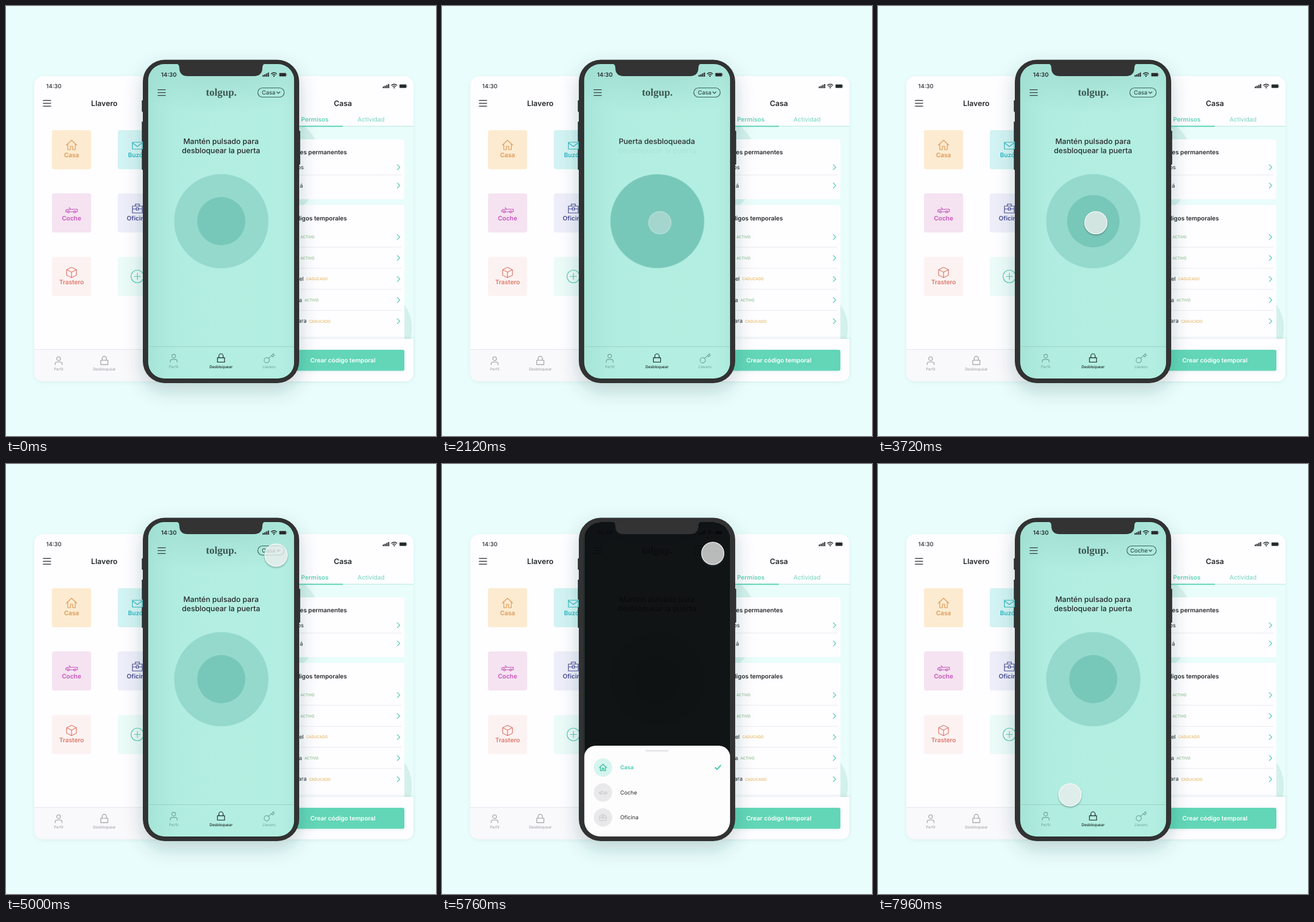
An HTML page that plays this animation: 748 by 748 pixels, repeating every 8 s.

```html
<!DOCTYPE html>
<html lang="es">
<head>
<meta charset="utf-8">
<title>Llavero digital</title>
<style>
  html, body { margin: 0; width: 100%; height: 100%; overflow: hidden; background: #e9fdfc; }
  svg { display: block; width: 748px; height: 748px; font-family: Inter, "Open Sans", sans-serif; text-rendering: geometricPrecision; }
  .line { fill: none; stroke: currentColor; stroke-width: 1.2; stroke-linecap: round; stroke-linejoin: round; }
</style>
</head>
<body>
<svg id="stage" viewBox="0 0 748 748"></svg>
<script>
const LOOP = 8000;
const TEAL = '#5fd3b8', INK = '#26292b';

// Icons are drawn around their own centre.
const ICONS = {
  house: 'M-9 0L0-8.5L9 0M-6.5-2V8H-2V2H2V8H6.5V-2',
  mail: 'M-8.5-6H8.5V6H-8.5ZM-8.5-5L0 1.5L8.5-5',
  car: 'M-7.2 3H-10V.6Q-9.5-1-6-1.2L-2-1.5H10V3H7.2M-3.8 3H3.8M-2-1.5L-4-4.5M-7.2 3a1.7 1.7 0 1 0 3.4 0a1.7 1.7 0 1 0-3.4 0M3.8 3a1.700 1.7 0 1 0 3.4 0a1.7 1.7 0 1 0-3.4 0',
  bag: 'M-8.5-4H8.5V8H-8.5ZM-3.5-4V-7.5H3.5V-4M-8.5 1H-2M2 1H8.5M-2-.8H2V3H-2Z',
  box: 'M0-9L8.5-4.8V4.8L0 9L-8.5 4.8V-4.8ZM-8.5-4.8L0-.5L8.5-4.8M0-.5V9',
  plus: 'M-11 0a11 11 0 1 0 22 0a11 11 0 1 0-22 0M-5.5 0H5.5M0-5.5V5.5',
  user: 'M-3.2-3.6a3.2 3.2 0 1 0 6.4 0a3.2 3.2 0 1 0-6.4 0M-6 7V5.5Q-6 2.2-2.7 2.2H2.7Q6 2.2 6 5.5V7',
  lock: 'M-6.2-.8H6.2V6.8H-6.2ZM-3.7-.8V-4a3.7 3.7 0 0 1 7.4 0V-.8',
  key: 'M-8.5 3.5a4.6 4.6 0 1 0 9.2 0a4.6 4.6 0 1 0-9.2 0M-.7.4L8-8M4.3-4.5L6.3-2.3L9.3-5.2L7-7.2',
  chevron: 'M-2.3-4.3L2-0L-2.3 4.3',
  check: 'M-4.5.2L-1.5 3.4L4.5-3.6'
};

const text = (x, y, str, size, weight = 400, color = INK, anchor = 'start', extra = '') =>
  `<text x="${x}" y="${y}" font-size="${size}" font-weight="${weight}" fill="${color}" text-anchor="${anchor}" ${extra}>${str}</text>`;
const rect = (x, y, w, h, fill, r = 0, extra = '') =>
  `<rect x="${x}" y="${y}" width="${w}" height="${h}" rx="${r}" fill="${fill}" ${extra}/>`;
const circle = (x, y, r, fill, extra = '') => `<circle cx="${x}" cy="${y}" r="${r}" fill="${fill}" ${extra}/>`;
const rule = (x1, x2, y, color, width = 1) =>
  `<path d="M${x1} ${y}H${x2}" stroke="${color}" stroke-width="${width}" fill="none"/>`;
const icon = (name, x, y, color, scale = 1, width = 1.2) =>
  `<path class="line" d="${ICONS[name]}" transform="translate(${x} ${y}) scale(${scale})" style="color:${color};stroke-width:${width / scale}"/>`;

const burger = (x, y) => [-5, 0, 5].map(d => rule(x, x + 14, y + d, '#33393a', 1.4)).join('');

function statusIcons(x, y) {
  const bars = [3, 4.3, 5.8, 7.3].map((h, i) => rect(x + i * 3, y - h, 2.1, h, INK, .5)).join('');
  const arcs = `<path d="M${x + 14.8} ${y - 4.8}q5-4.4 10 0M${x + 16.7} ${y - 2.7}q3.1-2.6 6.2 0" stroke="${INK}" stroke-width="1.5" fill="none"/>`;
  return bars + arcs + circle(x + 19.8, y - .9, 1.2, INK) +
    rect(x + 29, y - 6.5, 12, 6, INK, 1.3, `stroke="#8a9694" stroke-width=".7"`) + rect(x + 41.8, y - 4.5, .9, 2, '#8a9694');
}

function tile(x, y, fill, name, label, color, iconY = 27) {
  return rect(x, y, 68, 68, fill, 4) + icon(name, x + 34, y + iconY, color) +
    text(x + 34, y + 47, label, 10.7, 600, color, 'middle');
}

const navItem = (x, y, name, label, color, weight = 400) =>
  icon(name, x, y, color, 1, 1.15) + text(x, y + 17.3, label, 6.6, weight, color, 'middle');

function leftCard() {
  return rect(49, 122, 230, 531, '#fefdff', 16, 'filter="url(#cardShadow)"') +
    `<path d="M49 597.5H279V653H65Q49 653 49 637Z" fill="#f9f8fb"/>` + rule(49, 279, 597.5, '#e6e5ea') +
    text(70, 142.6, '14:30', 10, 500) + burger(64.3, 169.3) + text(171, 174, 'Llavero', 13, 600, INK, 'middle') +
    tile(80, 216, '#fcebd0', 'house', 'Casa', '#dc9858', 26) +
    tile(194.5, 216, '#d2f3f3', 'mail', 'Buzón', '#2bb8c0') +
    tile(80, 326, '#f5e3f1', 'car', 'Coche', '#c652ba', 29) +
    tile(194.5, 326, '#eeeefa', 'bag', 'Oficina', '#474891', 26) +
    tile(80, 436.5, '#fdf2f2', 'box', 'Trastero', '#dd7868') +
    tile(194.5, 436.5, '#ebfbf8', 'plus', '', '#58cdb3', 34) +
    navItem(91.5, 617, 'user', 'Perfil', '#9b9b9f') + navItem(171, 617, 'lock', 'Desbloquear', '#9b9b9f');
}

function permitRow(y, ending, endX, active) {
  const [label, color] = active ? ['ACTIVO', '#76b17c'] : ['CADUCADO', '#e2ab43'];
  return text(endX, y + 3, ending, 9.8, 400, INK, 'end') + text(endX + 4.2, y + 2.4, label, 6.5, 400, color) +
    icon('chevron', 683, y, TEAL, 1, 1.4);
}

function rightCard() {
  const rows = [[402, '', 508, 1], [438.3, '', 508, 1], [475, 'el', 518, 0], [511.6, 'a', 515, 1], [548.2, 'ara', 523, 0]];
  return rect(479, 122, 230, 531, '#fefdff', 16, 'filter="url(#cardShadow)"') +
    `<g clip-path="url(#rightBody)">` + rect(479, 210, 230, 370, '#e9fdfb') +
    circle(460, 277, 90, '#d3f1ec') + circle(636, 560, 70, '#d3f1ec') + '</g>' +
    statusIcons(655.5, 143) + text(586, 174, 'Casa', 13, 600, INK, 'middle') +
    text(561, 201, 'Permisos', 10.6, 600, TEAL, 'end') + text(635, 201, 'Actividad', 10.6, 400, '#74d5bf', 'middle') +
    rule(479, 709, 209.3, '#c5f0e6', 1.5) + rule(479, 586, 209.2, TEAL, 2) +
    rect(479, 232, 214, 104, '#fefdff', 4) + rect(479, 346, 214, 240, '#fefdff', 4) +
    text(593, 258, 'Llaves permanentes', 10.5, 600, INK, 'end') +
    text(518, 284, 'os', 9.8, 400, INK, 'end') + text(516.5, 315.5, 'á', 9.8, 400, INK, 'end') +
    [280.5, 312.3].map(y => icon('chevron', 683, y, TEAL, 1, 1.4)).join('') +
    text(593, 373, 'Códigos temporales', 10.5, 600, INK, 'end') +
    [294, 419.6, 456.2, 492.8, 529.5].map(y => rule(490, 688, y, '#e9e8ed')).join('') +
    rows.map(r => permitRow(...r)).join('') +
    `<path d="M479 579H709V637Q709 653 693 653H479Z" fill="#fefdff" filter="url(#footShadow)"/>` +
    rect(479, 598, 214, 36.5, '#62d6b7', 3, 'filter="url(#cardShadow)"') +
    text(586, 620, 'Crear código temporal', 10.5, 600, '#fff', 'middle');
}

function sheetRow(y, name, label, id) {
  return `<g id="${id}"><circle class="disc" cx="280" cy="${y}" r="16"/>${icon(name, 280, y, 'inherit', .68, 1.2)}` +
    text(310, y + 3.2, label, 9.5, 400) + '</g>';
}

function phone() {
  const button = (x, y, h) => rect(x, y, 4, h, '#2b2b2b', 1.2);
  const screen = (fill, extra) => rect(247, 101, 254.5, 547, fill, 0, extra);
  return button(236.3, 164, 20) + button(236.3, 201, 35) + button(236.3, 249, 36) + button(507.7, 217, 59) +
    rect(238, 93.5, 272, 562.5, '#333', 38, 'filter="url(#phoneShadow)"') +
    rect(246.3, 100.7, 255.4, 547.8, '#1c1f1f', 29) +
    `<g clip-path="url(#screen)">` + screen('#b2eee1') + screen('url(#sideTint)') + rect(247, 101, 254.5, 110, 'url(#topTint)') +
    text(269.8, 123, '14:30', 10, 600) + statusIcons(446.3, 123) + burger(263.8, 150.6) +
    text(374.5, 155.5, 'tolgup.', 18, 700, '#3c5752', 'middle', `style="font-family:'Liberation Serif',serif"`) +
    `<rect id="pill" y="142.5" height="16" rx="8" fill="none" stroke="#3c5f58" stroke-width="1.2"/>` +
    `<text id="pillText" y="154" font-size="9.8" font-weight="500" fill="#34514c"></text>` +
    `<path class="line" d="M471 149.3l2.8 2.7l2.8-2.7" style="color:#34514c"/>` +
    `<g id="hint">` + text(374, 239.8, 'Mantén pulsado para', 13, 500, INK, 'middle') +
    text(374, 256, 'desbloquear la puerta', 13, 500, INK, 'middle') + '</g>' +
    text(373.7, 239.8, 'Puerta desbloqueada', 13, 500, INK, 'middle', 'id="done"') +
    circle(374.5, 374.3, 82, '#95d9cd') + circle(374.5, 374.3, 42, '#78c8ba', 'id="core"') +
    rule(247, 501.5, 592.5, '#98cfc4') +
    navItem(291.7, 612.7, 'user', 'Perfil', '#6f9f96') + navItem(374, 612.7, 'lock', 'Desbloquear', '#15201e', 500) +
    navItem(457.5, 612.7, 'key', 'Llavero', '#6f9f96') +
    screen('#08080a', 'id="shade" opacity="0"') +
    `<g id="sheet">` + rect(247.3, 489.9, 254, 190, '#fefdfe', 20) + rect(354, 497.6, 40, 2.6, '#e4e4e7', 1.3) +
    sheetRow(528, 'house', 'Casa', 'rowCasa') + sheetRow(571.5, 'car', 'Coche', 'rowCoche') + sheetRow(614.7, 'bag', 'Oficina', 'rowOficina') +
    `<g id="check">${icon('check', 480, 528, '#41c9ad', 1, 2.1)}</g></g></g>` +
    `<path d="M295 100H452Q446 101 446 107Q446 122 431 122H316Q301.5 122 301.5 107Q301.5 101 295 100Z" fill="#333"/>`;
}

const defs = `<defs>
  <clipPath id="screen"><rect x="247.3" y="101" width="254" height="547" rx="28"/></clipPath>
  <clipPath id="rightBody"><rect x="479" y="210" width="230" height="370"/></clipPath>
  <linearGradient id="sideTint"><stop offset="0" stop-color="#5fae9f" stop-opacity=".16"/><stop offset=".2" stop-color="#8fd5c8" stop-opacity=".05"/><stop offset=".85" stop-color="#fff" stop-opacity="0"/><stop offset="1" stop-color="#5fae9f" stop-opacity=".08"/></linearGradient>
  <radialGradient id="topTint" cx=".5" cy="0" r=".8"><stop offset="0" stop-color="#5b9f92" stop-opacity=".22"/><stop offset="1" stop-color="#5b9f92" stop-opacity="0"/></radialGradient>
  <filter id="cardShadow" x="-10%" y="-10%" width="120%" height="130%"><feDropShadow dx="0" dy="1.5" stdDeviation="2.5" flood-color="#57918b" flood-opacity=".13"/></filter>
  <filter id="footShadow" x="-10%" y="-20%" width="120%" height="140%"><feDropShadow dx="0" dy="-2" stdDeviation="2" flood-color="#57918b" flood-opacity=".14"/></filter>
  <filter id="phoneShadow" x="-30%" y="-15%" width="160%" height="135%"><feDropShadow dx="0" dy="13" stdDeviation="16" flood-color="#2a4846" flood-opacity=".23"/></filter>
  <filter id="tapShadow" x="-50%" y="-50%" width="200%" height="200%"><feGaussianBlur stdDeviation="1.8"/></filter>
  <mask id="outsideTap"><rect x="-40" y="-40" width="80" height="80" fill="#fff"/><circle r="20" fill="#000"/></mask>
</defs>`;

const cursor = `<g id="cursor"><g id="cursorShadow" mask="url(#outsideTap)">${circle(0, 2, 20, '#334c48', 'opacity=".42" filter="url(#tapShadow)"')}</g>` +
  circle(0, 0, 20, '#eee', 'fill-opacity=".76"') + circle(0, 0, 19.4, 'none', 'stroke="#fff" stroke-opacity=".75" stroke-width="1.2"') + '</g>';

document.getElementById('stage').innerHTML =
  defs + rect(0, 0, 748, 748, '#e9fdfc') + leftCard() + rightCard() + phone() + cursor;

const $ = id => document.getElementById(id);
const set = (id, attrs) => Object.entries(attrs).forEach(([k, v]) => $(id).setAttribute(k, v));
const clamp = p => Math.max(0, Math.min(1, p));
const ease = p => p < .5 ? 4 * p ** 3 : 1 - 4 * (1 - p) ** 3;
const ramp = (t, start, end) => ease(clamp((t - start) / (end - start)));
// 0 to 1 and back
const pulse = (t, a, b, c, d) => ramp(t, a, b) - ramp(t, c, d);

function setRow(id, selected) {
  const row = $(id);
  row.querySelector('.disc').setAttribute('fill', selected ? '#d6f4ee' : '#e9e9eb');
  row.querySelector('.line').style.color = selected ? '#41c3aa' : '#cbcbce';
  row.querySelector('.line').style.strokeWidth = selected ? 2.3 : 1.7;
  const label = row.querySelector('text');
  label.setAttribute('fill', selected ? '#41c9ad' : INK);
  label.setAttribute('font-weight', selected ? 600 : 400);
}

function render(t) {
  const hold = pulse(t, 1400, 2240, 3320, 3880);
  const unlocked = pulse(t, 1800, 2210, 3320, 3800);
  set('core', { r: 42 + 39.7 * hold });
  set('hint', { opacity: 1 - unlocked });
  set('done', { opacity: unlocked });

  const open = pulse(t, 5240, 5640, 7660, 7900);
  set('shade', { opacity: .945 * open });
  set('sheet', { transform: `translate(0 ${160 * (1 - open)})`, visibility: open > 0 ? 'visible' : 'hidden' });

  const coche = t >= 7240;
  setRow('rowCasa', !coche);
  setRow('rowCoche', coche);
  setRow('rowOficina', false);
  set('check', { transform: `translate(0 ${coche ? 43.5 : 0})` });

  const switched = t >= 7660;
  const left = switched ? 433 : 438;
  set('pill', { x: left, width: 484 - left });
  set('pillText', { x: switched ? 438.8 : 445 });
  $('pillText').textContent = switched ? 'Coche' : 'Casa';

  const toPill = ramp(t, 4500, 5090), toRow = ramp(t, 6580, 7005);
  const leave = clamp((t - 7660) / 300) ** 2;
  const x = 379 + 92 * toPill - 109 * toRow - 28 * leave;
  const y = 377 - 221.5 * toPill + 420 * toRow;
  const press = pulse(t, 1200, 1400, 2240, 2440) + pulse(t, 5100, 5200, 5220, 5340) + pulse(t, 7080, 7180, 7220, 7340);
  set('cursor', { transform: `translate(${x} ${y})`, opacity: ramp(t, 560, 840) * (1 - .5 * press) });
  set('cursorShadow', { opacity: 1 - press });
}

const start = performance.now();
function tick() {
  render((performance.now() - start) % LOOP);
  requestAnimationFrame(tick);
}
tick();
</script>
</body>
</html>
```
